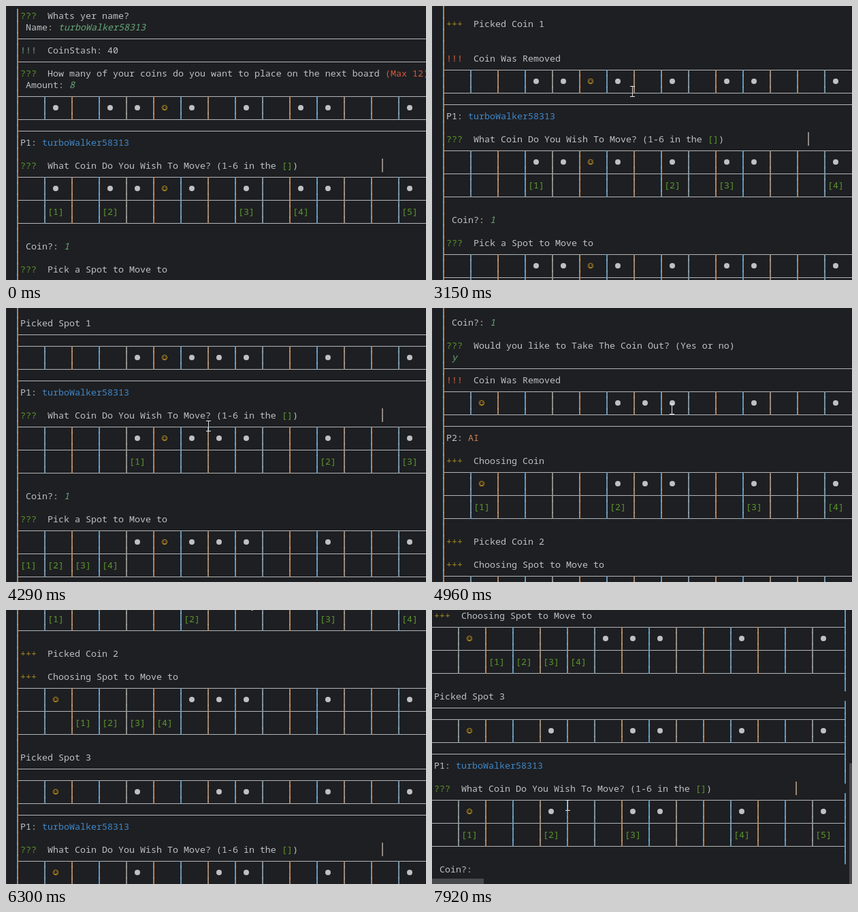
Recreate the animation shown at these times as an HTML page with a canvas. Size 617 by 404 pixels, loop 7.99 s.

```html
<!DOCTYPE html>
<html lang="en">
<head>
<meta charset="utf-8">
<title>Coin game terminal</title>
<style>
  html, body { margin: 0; width: 100%; height: 100%; overflow: hidden; background: #1e1f22; }
  canvas { display: block; }
</style>
</head>
<body>
<canvas id="stage" width="617" height="404"></canvas>
<script>
const ctx = document.getElementById('stage').getContext('2d');
const W = 617, H = 404, LOOP = 7990, STEPS = 119;
const LINE = 17, CHAR = 8, LEFT = 21, EDGE = 17, RIGHT = 625, CELL = 40;
const FONT = '13.333px "Noto Sans Mono", "DejaVu Sans Mono", monospace';
const PLAYER = 'turboWalker58313';
const C = {
  text: '#bcc1c6', green: '#5c962c', olive: '#a08a22', red: '#cf5b3c', grey: '#71917f',
  input: '#66a878', blue: '#3f87c9', orange: '#c98058', star: '#c8961e',
  coin: '#bfc0c3', rule: '#b2b5b9', thumb: '#48494b'
};

// ---- terminal log ----
const lines = [];
const put = (runs = [], right = 75) => lines.push({ runs, right });
const blank = () => put();
const rule = (joint = '-') => lines.push({ runs: [], right: 75, rule: joint });
const tagged = (tag, color, text) => put([[0, tag, color], [5, text]]);
const answer = (label, value) =>
  put([[1, label], [label.length + 2, value, C.input, true]], 0);

let coins = [1, 3, 4, 5, 6, 8, 10, 11, 14], star = 5;

function board(marks) {
  rule('t');
  lines.push({ runs: [], right: 75, coins, star, cells: true });
  if (marks) {
    rule('m');
    const runs = marks.map((c, i) => [c * 5, `[${i + 1}]`, C.green]);
    lines.push({ runs, right: 75, cells: true });
  }
  rule('b');
}

function turn(human, pick, spot) {
  if (human) {
    put([[0, 'P1:'], [4, PLAYER, C.blue]]);
    blank();
    put([[0, '???', C.green], [5, 'What Coin Do You Wish To Move? (1-6 in the '],
      [48, '[]', C.green], [50, ')']], 66);
  } else {
    put([[0, 'P2:'], [4, 'AI', C.orange]]);
    blank();
    tagged('+++', C.olive, 'Choosing Coin');
  }
  const movable = coins.filter(c => !coins.includes(c - 1));
  board(movable);
  blank();
  if (human) answer('Coin?:', pick ? String(pick) : '');
  else tagged('+++', C.olive, 'Picked Coin ' + pick);
  if (!pick) return;

  blank();
  const from = movable[pick - 1];
  if (spot) {
    if (human) tagged('???', C.green, 'Pick a Spot to Move to');
    else tagged('+++', C.olive, 'Choosing Spot to Move to');
    const free = [];
    for (let c = from - 1; c >= 0 && !coins.includes(c); c--) free.unshift(c);
    board(free);
    blank();
    if (human) answer('Spot?:', String(spot));
    else put([[0, 'Picked Spot ' + spot]], 0);
    const to = free[spot - 1];
    coins = coins.map(c => c === from ? to : c);
    if (star === from) star = to;
    rule();
  } else {
    if (human) {
      tagged('???', C.green, 'Would you like to Take The Coin Out? (Yes or no)');
      put([[1, 'y', C.input, true]], 0);
      rule();
    } else blank();
    coins = coins.filter(c => c !== from);
    tagged('!!!', C.red, 'Coin Was Removed');
  }
  board();
  rule();
}

tagged('???', C.green, 'Whats yer name?');
answer('Name:', PLAYER);
rule();
tagged('!!!', C.grey, 'CoinStash: 40');
rule();
put([[0, '???', C.green],
  [5, 'How many of your coins do you want to place on the next board '],
  [67, '(Max 12)', C.red]]);
answer('Amount:', '8');
board();
rule();
// Coin and spot of each turn, players alternating; spot 0 takes the coin out.
'11 10 11 31 10 21 11 21 10 23 00'.split(' ')
  .forEach(([pick, spot], i) => turn(i % 2 === 0, +pick, +spot));

const ramp = (n, from, to) => Math.min(1, Math.max(0, (n - from) / (to - from)));

function scrollAt(n) {
  const fling = 1 - (1 - ramp(n, 88, 100)) ** 2.34;
  return Math.round(736 * ramp(n, 39, 47) + 1585 * ramp(n, 47, 64) +
    1072 * ramp(n, 64, 74) + 51 * ramp(n, 74, 75) + 319 * fling);
}

const panAt = n => Math.round(ramp(n, 93, 94) + 17 * ramp(n, 102, 109));

// Each glide: first step, last step, destination.
const glides = [[4, 15, 110, 60], [15, 27, 164, -6], [35, 38, 187, 125], [39, 47, 294, 126],
  [47, 64, 297, 174], [64, 74, 352, 149], [79, 87, 355, -16], [112, 118, 199, 288]];

function mouseAt(n) {
  let x = 427, y = 364;
  for (const [from, to, tx, ty] of glides) {
    const k = ramp(n, from, to);
    x += (tx - x) * k;
    y += (ty - y) * k;
  }
  return [Math.round(x), Math.round(y)];
}

// ---- drawing ----
function rect(x, y, w, h, color) {
  ctx.fillStyle = color;
  ctx.fillRect(x, y, w, h);
}

function disc(x, y, r, color) {
  ctx.fillStyle = color;
  ctx.beginPath();
  ctx.arc(x, y, r, 0, Math.PI * 2);
  ctx.fill();
}

function face(x, y) {
  ctx.strokeStyle = C.star;
  ctx.lineWidth = 0.9;
  ctx.beginPath();
  ctx.arc(x, y, 3.7, 0, Math.PI * 2);
  ctx.moveTo(x + 2, y + 0.8);
  ctx.arc(x, y + 0.8, 2, 0, Math.PI);
  ctx.stroke();
  for (const dx of [-1.5, 1.5]) disc(x + dx, y - 1, 0.7, C.star);
}

// Subpixel-rendered stroke: a blue pixel beside an orange one.
function bar(x, y, top = -10, bottom = 10) {
  rect(x - 1, y + top, 1, bottom - top, 'rgba(100,166,212,.85)');
  rect(x, y + top, 1, bottom - top, 'rgba(208,150,102,.85)');
}

function drawLine(line, y) {
  if (line.rule) rect(EDGE, y, RIGHT - EDGE, 1, C.rule);
  bar(EDGE, y);
  if (line.right) bar(LEFT + line.right * CHAR + 4, y);
  if (line.cells || (line.rule && line.rule !== '-')) {
    const top = line.rule === 't' ? 0 : -10, bottom = line.rule === 'b' ? 1 : 10;
    for (let c = 1; c < 15; c++) bar(EDGE + c * CELL, y, top, bottom);
  }
  for (const c of line.coins || []) {
    const x = LEFT + c * CELL + 12;
    if (c === line.star) face(x, y);
    else disc(x, y, 4, C.coin);
  }
  for (const [col, text, color = C.text, italic] of line.runs) {
    ctx.font = (italic ? 'italic ' : '') + FONT;
    ctx.fillStyle = color;
    ctx.fillText(text, LEFT + col * CHAR, y + 5);
  }
}

function drawMouse(x, y) {
  if (y < 12) {
    ctx.beginPath();
    [[0, 0], [0, 15], [3.5, 12], [6, 17], [8.5, 16], [6, 11], [11, 11]]
      .forEach(([dx, dy]) => ctx.lineTo(x + dx, y + dy));
    ctx.fillStyle = '#fff';
    ctx.fill();
  } else {
    rect(x, y - 7, 1, 15, '#d8d8d8');
    for (const dy of [-8, 7]) rect(x - 3, y + dy, 7, 1, '#e6e6e6');
  }
}

function render(ms) {
  const n = Math.floor((ms + 10) * STEPS / LOOP);
  const scroll = scrollAt(n), pan = panAt(n);
  rect(0, 0, W, H, '#1e1f22');
  ctx.save();
  ctx.translate(-pan, 0);
  rect(0, 0, 1, H, '#2b2d30');
  lines.forEach((line, i) => {
    const y = 14 + i * LINE - scroll;
    if (y > -LINE && y < H + LINE) drawLine(line, y);
  });
  ctx.restore();
  if (pan > 9) {
    rect(613, 226, 4, H - 226, C.thumb);
    rect(0, 396, 76, 8, C.thumb);
  }
  if (n >= 4) drawMouse(...mouseAt(n));
}

const start = performance.now();
function tick() {
  render((performance.now() - start) % LOOP);
  requestAnimationFrame(tick);
}
tick();
</script>
</body>
</html>
```
